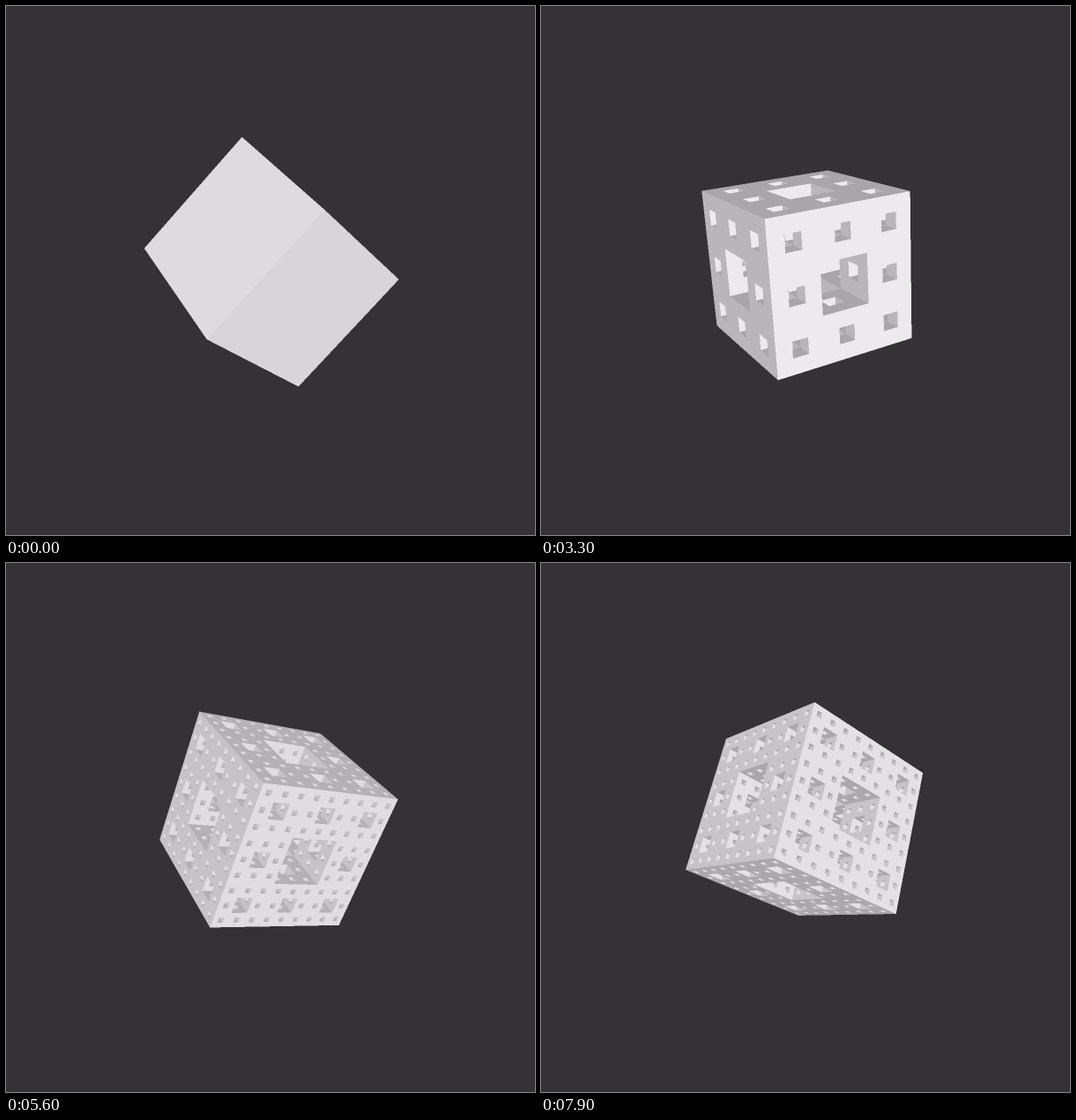
These frames come from a looping animation (600 by 600 pixels, 8 s). An HTML page with a canvas:

```html
<!DOCTYPE html>
<html lang="en">
<head>
<meta charset="utf-8">
<title>Menger sponge</title>
<style>
  html, body { margin: 0; width: 100%; height: 100%; overflow: hidden; background: #343234; }
  canvas { display: block; width: 600px; height: 600px; }
</style>
</head>
<body>
<canvas id="stage" width="600" height="600"></canvas>
<script>
const LOOP = 8000, STEP = 100;
const SIZE = 168.1, FOCAL = 740, CX = 300.2, CY = 292.4;
const BACK = [52, 50, 52];
const BOX = { x: 145, y: 140, w: 312, h: 310 };

// start of each recursion level in ms
const LEVEL_START = [0, 900, 3200, 5400];
// turning speed in degrees per second; the deepest level turns slower
const START_ANGLE = 501.7, FAST = 33.3, SLOW = 19;

const ctx = document.getElementById('stage').getContext('2d');
const image = ctx.createImageData(BOX.w, BOX.h);

function isSolid(x, y, z, level) {
  for (let i = 0; i < level; i++) {
    if ((x % 3 === 1) + (y % 3 === 1) + (z % 3 === 1) > 1) return 0;
    x = Math.floor(x / 3);
    y = Math.floor(y / 3);
    z = Math.floor(z / 3);
  }
  return 1;
}

function buildSponge(level) {
  const n = 3 ** level, cells = new Uint8Array(n * n * n);
  for (let z = 0, i = 0; z < n; z++)
    for (let y = 0; y < n; y++)
      for (let x = 0; x < n; x++) cells[i++] = isSolid(x, y, z, level);
  return { n, cells };
}

const sponges = LEVEL_START.map((_, level) => buildSponge(level));

function angleAt(ms) {
  const slowFrom = LEVEL_START[3];
  const deg = START_ANGLE
    + FAST * Math.min(ms, slowFrom) / 1000
    + SLOW * Math.max(0, ms - slowFrom) / 1000;
  return deg * Math.PI / 180;
}

// Rx(a) * Ry(0.3a) * Rz(0.1a)
function rotation(a) {
  const sa = Math.sin(a), ca = Math.cos(a);
  const sb = Math.sin(a * 0.3), cb = Math.cos(a * 0.3);
  const sc = Math.sin(a * 0.1), cc = Math.cos(a * 0.1);
  return [
    [cb * cc, -cb * sc, sb],
    [ca * sc + sa * sb * cc, ca * cc - sa * sb * sc, -sa * cb],
    [sa * sc - ca * sb * cc, sa * cc + ca * sb * sc, ca * cb]
  ];
}

const dir = [0, 0, 0], cell = [0, 0, 0], next = [0, 0, 0], delta = [0, 0, 0], move = [0, 0, 0];

// Walks a ray through the grid; returns the grey of the face it meets, or -1.
function trace(eye, sponge, shade) {
  const { n, cells } = sponge;
  let enter = -Infinity, leave = Infinity, axis = 0;
  for (let k = 0; k < 3; k++) {
    if (Math.abs(dir[k]) < 1e-9) dir[k] = 1e-9;
    const up = dir[k] > 0;
    const near = ((up ? 0 : n) - eye[k]) / dir[k];
    const far = ((up ? n : 0) - eye[k]) / dir[k];
    if (near > enter) { enter = near; axis = k; }
    if (far < leave) leave = far;
  }
  if (enter >= leave) return -1;

  for (let k = 0; k < 3; k++) {
    const up = dir[k] > 0;
    const at = Math.floor(eye[k] + dir[k] * enter);
    move[k] = up ? 1 : -1;
    cell[k] = k === axis ? (up ? 0 : n - 1) : Math.min(n - 1, Math.max(0, at));
    next[k] = (cell[k] + (up ? 1 : 0) - eye[k]) / dir[k];
    delta[k] = Math.abs(1 / dir[k]);
  }

  for (;;) {
    if (cells[(cell[2] * n + cell[1]) * n + cell[0]]) return shade[axis][move[axis] > 0 ? 0 : 1];
    axis = next[0] < next[1] ? (next[0] < next[2] ? 0 : 2) : (next[1] < next[2] ? 1 : 2);
    cell[axis] += move[axis];
    if (cell[axis] < 0 || cell[axis] >= n) return -1;
    next[axis] += delta[axis];
  }
}

function grey(facing) {
  return Math.min(246, 128 * (1 + Math.max(0, facing)));
}

function draw(ms) {
  const level = LEVEL_START.filter(start => start <= ms).length - 1;
  const sponge = sponges[level];
  const m = rotation(angleAt(ms));
  const unit = sponge.n / SIZE;
  const eye = m[2].map(v => v * FOCAL * unit + sponge.n / 2);
  const shade = m[2].map(v => [grey(-v), grey(v)]);
  const data = image.data;

  for (let py = 0, i = 0; py < BOX.h; py++) {
    for (let px = 0; px < BOX.w; px++, i += 4) {
      let hits = 0, light = 0;
      for (let s = 0; s < 4; s++) {
        const x = BOX.x + px + 0.25 + 0.5 * (s & 1) - CX;
        const y = BOX.y + py + 0.25 + 0.5 * (s >> 1) - CY;
        for (let k = 0; k < 3; k++)
          dir[k] = (m[0][k] * x + m[1][k] * y - m[2][k] * FOCAL) * unit;
        const v = trace(eye, sponge, shade);
        if (v >= 0) { hits++; light += v; }
      }
      const gap = 4 - hits;
      data[i] = (light + gap * BACK[0]) / 4;
      data[i + 1] = (light - 2 * hits + gap * BACK[1]) / 4;
      data[i + 2] = (light + gap * BACK[2]) / 4;
      data[i + 3] = 255;
    }
  }
  ctx.putImageData(image, BOX.x, BOX.y);
}

ctx.fillStyle = `rgb(${BACK})`;
ctx.fillRect(0, 0, 600, 600);

const began = performance.now();
let shown = -1;
function tick() {
  const ms = Math.max(0, performance.now() - began) % LOOP;
  const step = Math.floor(ms / STEP);
  if (step !== shown) {
    shown = step;
    draw(step * STEP);
  }
  requestAnimationFrame(tick);
}
tick();
</script>
</body>
</html>
```
